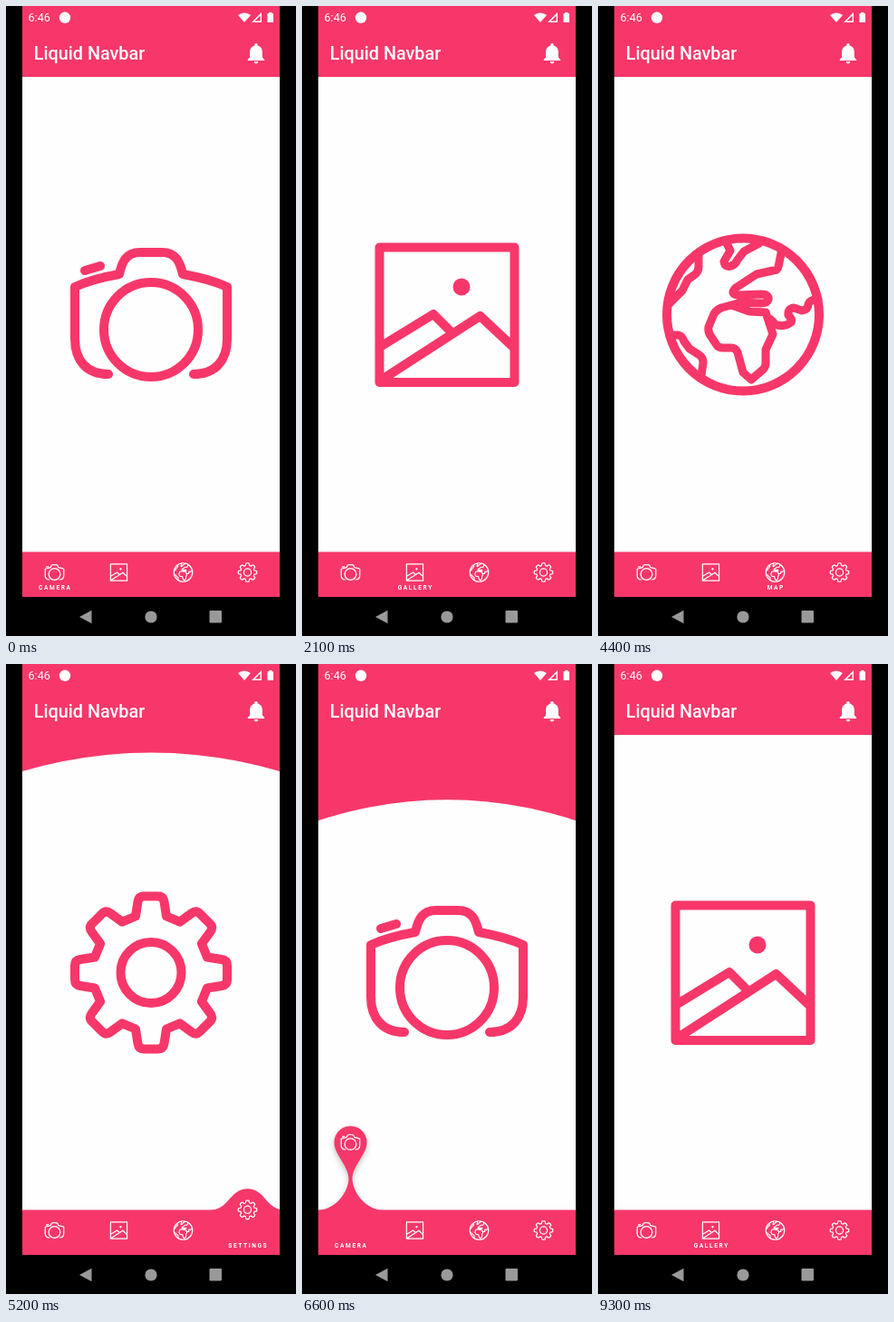
These frames come from a looping animation (320 px wide and 693 px high, 9.4 s). An HTML page:

```html
<!DOCTYPE html>
<html lang="en">
<head>
<meta charset="utf-8">
<title>Liquid Navbar</title>
<style>
  html, body { margin: 0; width: 100%; height: 100%; overflow: hidden; background: #000; }
  svg { display: block; width: 100%; height: 100%; }
  text { font-family: Roboto, sans-serif; fill: #fff; }
  .icon { fill: none; stroke: currentColor; stroke-width: 10; stroke-linecap: round; stroke-linejoin: round; }
  .dot { fill: currentColor; stroke: none; }
  #labels text { font-size: 6.6px; font-weight: 700; letter-spacing: 1.6px; text-anchor: middle; }
</style>
</head>
<body>
<svg viewBox="0 0 320 693">
  <defs>
    <clipPath id="screen"><rect x="18" width="284" height="650"/></clipPath>
    <clipPath id="reveal"><circle id="hole" cx="160" cy="601" r="545"/></clipPath>
    <filter id="blur" x="-50%" y="-50%" width="200%" height="200%"><feGaussianBlur stdDeviation="3"/></filter>

    <!-- Icons are centred on the origin -->
    <g id="camera" class="icon">
      <g transform="translate(-160 -339.5)">
        <path d="M87 291L104 286"/>
        <path d="M113 405C89 405 76 390 76 366V309C91 302 108 298 125 295C128 282 132 271 148 271H172C188 271 192 282 195 295C212 298 229 302 244 309V366C244 390 231 405 207 405"/>
        <circle cx="160" cy="356" r="52"/>
      </g>
    </g>
    <g id="gallery" class="icon" stroke-width="11">
      <g transform="translate(-160 -339.5)">
        <path d="M85.5 265.5H234.5V414H85.5ZM86 375L145 339L164 358M88 411L196.5 341L234 376"/>
        <circle class="dot" cx="176" cy="309" r="9.5"/>
      </g>
    </g>
    <g id="map" class="icon">
      <circle r="84"/>
      <path stroke-width="9" style="stroke-width:9" transform="translate(-160 -339.5)" d="M111 271V287Q111 293 106 296L99 301L93 313L79 327
        M141 259L146 269L139 281Q140 288 147 286Q152 284 154 279L161 270L178 261
        M203 267L199 287Q198 291 193 291L175 295L152 310Q145 317 154 318L180 317Q189 317 188 323Q187 327 179 327L158 326L136 332Q129 335 127 341L122 353Q121 359 125 364L131 373Q133 376 138 376H147Q152 376 154 381L160 403L169 411L182 400Q185 397 185 393V378L193 361L187 343L185 337L167 336L150 330
        M187 343Q192 345 195 350Q205 354 213 348Q215 345 210 340Q209 333 216 332L225 335Q232 334 232 328Q235 322 243 323
        M79 362H89Q93 363 95 369L101 377L112 384Q116 387 116 392L114 407"/>
    </g>
    <g id="settings" class="icon"><circle r="33.5"/><path id="teeth"/></g>
  </defs>

  <rect width="320" height="693"/>
  <g clip-path="url(#screen)">
    <rect x="18" width="284" height="650" fill="#f7376a"/>
    <g clip-path="url(#reveal)" color="#f7376a">
      <rect x="18" y="78" width="284" height="523" fill="#fefefe"/>
      <use id="page" href="#camera" transform="translate(160 339.5)"/>
    </g>
    <path id="shade" transform="translate(0 3)" fill="#000" filter="url(#blur)"/>
    <rect x="18" y="600.5" width="284" height="50" fill="#f7376a"/>
    <path id="drop" fill="#f7376a"/>
    <g id="tabs" color="#fff"></g>
    <g id="labels"></g>
    <circle id="touch" r="10" fill="#fff"/>
  </g>

  <text x="24.5" y="17.3" font-size="12.6">6:46</text>
  <circle cx="65" cy="12.8" r="6.2" fill="#fff"/>
  <g fill="#fff">
    <path d="M256 10Q263 5 270 10L263 18Z"/>
    <path d="M282 7V18H271Z"/>
    <path d="M280.6 10.5V16.6H274.6Z" fill="#f7376a"/>
    <path d="M288.5 8.3H290V7H293.4V8.3H295V18H288.5Z"/>
    <path transform="translate(262.2 38.1) scale(1.15)" d="M12 22c1.1 0 2-.9 2-2h-4c0 1.1.9 2 2 2zm6-6v-5c0-3.07-1.64-5.64-4.5-6.32V4c0-.83-.67-1.5-1.5-1.5s-1.5.67-1.5 1.5v.68C7.63 5.36 6 7.92 6 11v5l-2 2v1h16v-1l-2-2z"/>
  </g>
  <text x="30.8" y="59.2" font-size="19.8" font-weight="500">Liquid Navbar</text>
  <g fill="#999">
    <path d="M81 672L94.5 664.8V679.2Z"/>
    <circle cx="160" cy="672" r="6.6"/>
    <rect x="224.5" y="665" width="13.5" height="13.5" rx="1"/>
  </g>
</svg>
<script>
const LOOP = 9400, SPAN = 800, RADIUS = 545, BASE = 601, REST = 623;
const names = ['camera', 'gallery', 'map', 'settings'];
const tabX = i => 53.5 + 71 * i;
// start time, tab, finger position
const taps = [
  [1289, 1, 136, 618], [2906, 2, 200, 606], [4462, 3, 270, 618],
  [5938, 0, 58, 618], [7430, 1, 132, 618]
];
// progress, value
const rise = [[0, 0], [.117, 17], [.264, 30], [.5, 66], [.72, 104], [.828, 97], [.923, 23], [1, 0]];
const crown = [[0, 16], [.264, 16], [.5, 18], [.828, 18], [.923, 23], [1, 16]];

const $ = id => document.getElementById(id);
const clamp = v => Math.max(0, Math.min(1, v));
const set = (el, attrs) => { for (const k in attrs) el.setAttribute(k, attrs[k]); };
const add = (parent, tag, attrs) => {
  const el = document.createElementNS('http://www.w3.org/2000/svg', tag);
  set(el, attrs);
  return parent.appendChild(el);
};

// Monotone cubic through the given points
function curve(pts, x) {
  let i = 0;
  while (i < pts.length - 2 && x > pts[i + 1][0]) i++;
  const slope = j => (pts[j + 1][1] - pts[j][1]) / (pts[j + 1][0] - pts[j][0]);
  const tangent = j => {
    if (j === 0) return slope(0);
    if (j === pts.length - 1) return slope(j - 1);
    const a = slope(j - 1), b = slope(j);
    return a * b <= 0 ? 0 : 2 * a * b / (a + b);
  };
  const [x0, y0] = pts[i], [x1, y1] = pts[i + 1], w = x1 - x0;
  const u = clamp((x - x0) / w), v = 1 - u;
  return y0 * (1 + 2 * u) * v * v + tangent(i) * w * u * v * v
    + y1 * u * u * (3 - 2 * u) - tangent(i + 1) * w * u * u * v;
}

function gearPath() {
  const tooth = [[-17, -62], [-14.5, -78], [-13.5, -84], [-8, -84], [8, -84], [13.5, -84], [14.5, -78], [17, -62]];
  let d = '';
  for (let k = 0; k < 8; k++) {
    const c = Math.cos(k * Math.PI / 4), s = Math.sin(k * Math.PI / 4);
    const p = tooth.map(([x, y]) => `${(x * c - y * s).toFixed(2)} ${(x * s + y * c).toFixed(2)}`);
    d += `${k ? 'L' : 'M'}${p[0]}L${p[1]}Q${p[2]} ${p[3]}L${p[4]}Q${p[5]} ${p[6]}L${p[7]}`;
  }
  return d + 'Z';
}

function dropPath(x, iconY, top) {
  const h = BASE - top, gap = BASE - iconY;
  if (h <= 0) return '';
  if (gap < 25) {
    const w = Math.min(43, 26 + h * .7);
    return `M${x - w} ${BASE}C${x - 20} ${BASE} ${x - 20} ${top} ${x} ${top}` +
      `C${x + 20} ${top} ${x + 20} ${BASE} ${x + w} ${BASE}Z`;
  }
  const k = clamp((gap - 25) / 45), n = 18 - 16 * k, w = 43 - 6 * k;
  const mid = BASE - gap * .47, neck = gap * .2, y = iconY + 5;
  return `M${x - w} ${BASE}C${x - w * .45} ${BASE} ${x - n} ${mid + neck} ${x - n} ${mid}` +
    `C${x - n} ${mid - neck * .8} ${x - 16} ${y + 9} ${x - 17.3} ${y}` +
    `A18 18 0 1 1 ${x + 17.3} ${y}` +
    `C${x + 16} ${y + 9} ${x + n} ${mid - neck * .8} ${x + n} ${mid}` +
    `C${x + n} ${mid + neck} ${x + w * .45} ${BASE} ${x + w} ${BASE}Z`;
}

$('teeth').setAttribute('d', gearPath());
const icons = names.map(n => add($('tabs'), 'use', { href: '#' + n }));
const labels = names.map((n, i) => {
  const el = add($('labels'), 'text', { x: tabX(i) + .8 });
  el.textContent = n.toUpperCase();
  return el;
});

function draw(time) {
  let step = -1;
  while (step + 1 < taps.length && time >= taps[step + 1][0]) step++;
  const tab = step < 0 ? 0 : taps[step][1];
  const prev = step < 1 ? 0 : taps[step - 1][1];
  const p = step < 0 ? 1 : clamp((time - taps[step][0]) / SPAN);
  const lift = curve(rise, p), iconY = REST - lift;

  set($('hole'), { r: RADIUS * p });
  set($('page'), { href: '#' + names[tab] });
  const d = dropPath(tabX(tab), iconY, iconY - curve(crown, p));
  set($('drop'), { d });
  set($('shade'), { d, opacity: .25 * clamp((lift - 20) / 60) });

  icons.forEach((el, i) =>
    set(el, { transform: `translate(${tabX(i)} ${i === tab ? iconY : REST}) scale(.122)` }));

  labels.forEach((el, i) => {
    let a = 0;
    if (i === tab) a = clamp((p - .08) / .16);
    else if (i === prev) a = clamp((.3 - p) / .18);
    const v = Math.round(255 * a);
    el.style.fill = `rgba(${v},${v},${v},${a})`;
    set(el, { y: 641.6 + 6 * (1 - a) });
  });

  const tap = taps.find(([t]) => time >= t - 40 && time < t + 240);
  set($('touch'), tap
    ? { cx: tap[2], cy: tap[3], opacity: .32 * clamp((tap[0] + 240 - time) / 30) }
    : { opacity: 0 });
}

function tick() {
  draw(performance.now() % LOOP);
  requestAnimationFrame(tick);
}
tick();
</script>
</body>
</html>
```
